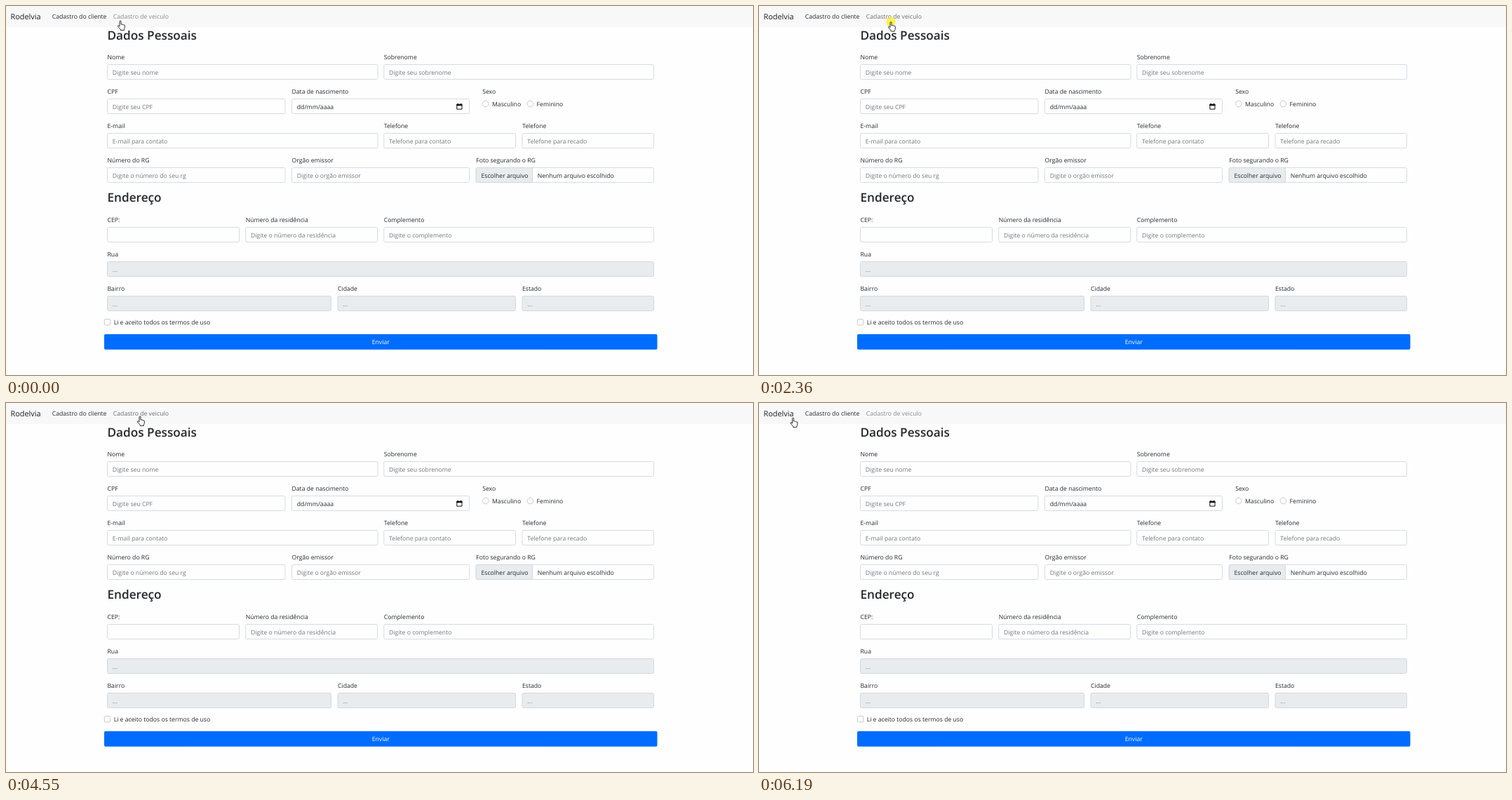
An HTML page that plays this animation: 1065 px wide and 526 px high, repeating every 6.26 s.

```html
<!DOCTYPE html>
<html lang="pt-BR">
<head>
<meta charset="utf-8">
<title>Cadastro</title>
<style>
  html, body { margin: 0; width: 100%; height: 100%; overflow: hidden; background: #fefefe; }
  svg { display: block; width: 1065px; height: 526px; }
  text { font: 8.66px "Open Sans", "Noto Sans", sans-serif; fill: #24282c; text-rendering: geometricPrecision; }
  text.title { font-size: 17.2px; font-weight: 600; }
  text.brand { font-size: 10.85px; fill: #1c1c1c; }
  text.hint { fill: #70787f; }
  text.button { fill: #fff; text-anchor: middle; }
  .box { fill: #fefefe; stroke: #d7dbdf; }
  .off { fill: #e9ecef; stroke: #d3d8dc; }
  .check { fill: #fefefe; stroke: #c9c9c9; }
  .swatch { fill: #000; stroke: #777; stroke-width: .6; }
  .blue { fill: #006dfe; }
  #click { fill: #fff01e; opacity: .75; }
</style>
</head>
<body>
<svg viewBox="0 0 1065 526">
  <rect width="1065" height="30" fill="#f8f8f8"/>
  <g id="nav"></g>
  <g id="client"></g>
  <g id="vehicle"></g>
  <circle id="click" r="6.8"/>
  <path id="hand" fill="#fff" stroke="#222" stroke-width=".95" stroke-linejoin="round"
    d="M-1 8V1.2a1 1 0 0 1 2 0V5.2q1.2-.8 1.9.3q1.2-.6 1.8.5q1.5-.4 1.6 1V9.5q0 1.5-1 2.6V13.6H.2V12.4L-3.4 8.2q-.6-1.4.8-1.4z"/>
</svg>
<script>
const $ = id => document.getElementById(id);
const LOOP = 6260;

// Drawing helpers; text is placed by its vertical centre
const text = (x, y, s, cls = '') => `<text x="${x}" y="${y + 3}" class="${cls}">${s}</text>`;
const title = (x, y, s) => `<text x="${x}" y="${y}" class="title">${s}</text>`;
const rect = (x, y, w, h, cls, r = 2) =>
  `<rect x="${x}" y="${y}" width="${w}" height="${h}" rx="${r}" class="${cls}"/>`;
const box = (x, y, right, cls = 'box') => rect(x, y, right - x, 21, cls);
const check = (x, y, s) => rect(x, y - 4.5, 8.5, 8.5, 'check') + text(x + 13.4, y + .3, s);
const radio = (x, y, s) => `<circle cx="${x}" cy="${y}" r="4.3" class="check"/>` + text(x + 9.2, y + .5, s);
const button = (x, y, w) => rect(x, y, w, 21.9, 'blue') + text(x + w / 2, y + 11.2, 'Enviar', 'button');
const calendar = (x, y) =>
  `<path d="M${x - 3.6} ${y - 3}h7.2v6.7h-7.2z" fill="none" stroke="#111"/>
   <path d="M${x - 4} ${y - 3.6}h8v2.4h-8zM${x - 2.9} ${y - 4.6}h1.2v1h-1.2zM${x + 1.7} ${y - 4.6}h1.2v1h-1.2z" fill="#111"/>`;
const field = (x, y, right, label, hint = '', off = false) =>
  text(x, y - 11, label) + box(x, y, right, off ? 'off' : 'box') + text(x + 7.3, y + 11, hint, 'hint');

$('nav').innerHTML = text(6.5, 15.6, 'Rodelvia', 'brand') +
  text(65.7, 14.8, 'Cadastro do cliente') +
  text(152.8, 14.8, 'Cadastro de veiculo');
const link = $('nav').lastElementChild;

$('client').innerHTML = [
  title(144.5, 48, 'Dados Pessoais'),
  field(144.5, 83.5, 530, 'Nome', 'Digite seu nome'),
  field(538.8, 83.5, 923.5, 'Sobrenome', 'Digite seu sobrenome'),
  field(144.5, 132.5, 398, 'CPF', 'Digite seu CPF'),
  field(407.5, 132.5, 660.5, 'Data de nascimento'),
  text(414.8, 143.5, 'dd/mm/aaaa'), calendar(646.4, 143.4),
  text(679.2, 121.5, 'Sexo'),
  radio(683.8, 139.4, 'Masculino'), radio(747.4, 139.4, 'Feminino'),
  field(144.5, 181.5, 530, 'E-mail', 'E-mail para contato'),
  field(538.8, 181.5, 726.5, 'Telefone', 'Telefone para contato'),
  field(736, 181.5, 923.5, 'Telefone', 'Telefone para recado'),
  field(144.5, 230.5, 398, 'Número do RG', 'Digite o número do seu rg'),
  field(407.5, 230.5, 660.5, 'Orgão emissor', 'Digite o orgão emissor'),
  field(670.2, 230.5, 923.5, 'Foto segurando o RG'),
  box(670.2, 230.5, 750.5, 'off'),
  text(677.5, 241.5, 'Escolher arquivo'), text(757.7, 241.5, 'Nenhum arquivo escolhido'),
  title(144.5, 279, 'Endereço'),
  field(144.5, 315.5, 332.5, 'CEP:'),
  field(341.7, 315.5, 529.5, 'Número da residência', 'Digite o número da residência'),
  field(538.8, 315.5, 923.5, 'Complemento', 'Digite o complemento'),
  field(144.5, 364.5, 923.5, 'Rua', '...', true),
  field(144.5, 413.5, 463.5, 'Bairro', '...', true),
  field(473, 413.5, 726.5, 'Cidade', '...', true),
  field(736, 413.5, 923.5, 'Estado', '...', true),
  check(140.3, 450.9, 'Li e aceito todos os termos de uso'),
  button(140, 467.8, 788.5)
].join('');

const rows = ['Modelo do veículo', 'Marca do veículo', 'Chassi do veículo', 'Placa do veículo',
  'Km autal do veículo', 'Data e hora da venda', 'Data do final da garantia'];
const extras = ['Freio abs', 'Multimidia', 'Roda aro 17', 'Cor personalizada', 'Wi-fi', 'Seguro'];

$('vehicle').innerHTML = [
  title(167.7, 86, 'Cadastro do veiculo'),
  ...rows.map((s, i) =>
    text(167.7, 105 + 30.75 * i, s) + box(292.3, Math.round(93.6 + 30.75 * i) + .5, 900.5)),
  text(299.6, 258.9, 'dd/mm/aaaa --:--'), calendar(885.9, 258),
  text(299.6, 289.6, 'dd/mm/aaaa'), calendar(885.9, 288.7),
  text(167.7, 320.4, 'Cor do veículo'),
  rect(292.3, 309.5, 608.2, 15, 'box'), rect(299.5, 313.2, 593.5, 7.3, 'swatch', 0),
  text(167.7, 347, 'Adicionais'),
  ...extras.map((s, i) => check(292.3, 346.7 + 14.85 * i, s)),
  button(167.7, 437.6, 39.1)
].join('');

// Pointer stops: time, x, y
const path = [
  [0, 163, 21], [70, 163, 21], [140, 178, 21], [600, 178, 21], [940, 134, 16], [1150, 116, 13.3],
  [1690, 116, 13.3], [2100, 188, 22.5], [2450, 188, 22.5], [2910, 114, 13.3], [3050, 111.8, 13.3],
  [3430, 111.8, 13.3], [3810, 44, 16], [3920, 37, 18], [4490, 191, 18.8], [4720, 191, 18.8],
  [5110, 40, 20], [5250, 36, 22.5], [5450, 35, 17.3], [6050, 35, 17.3], [6190, 48.5, 21], [LOOP, 48.5, 21]
];
const clicks = [[340, 410], [1210, 1350], [2290, 2430], [3250, 3390], [4610, 4690], [5790, 5920]];
const vehiclePage = [[410, 1350], [2430, 3390], [4690, 6120]];
const darkLink = [[100, 1350], [1950, 3390], [4330, 5860]];
const within = (spans, t) => spans.some(([a, b]) => t >= a && t < b);
const show = (id, on) => $(id).style.display = on ? '' : 'none';

function draw(now) {
  const t = now % LOOP;
  const i = path.findIndex(p => p[0] > t);
  const [t0, x0, y0] = path[i - 1], [t1, x1, y1] = path[i];
  const u = (t - t0) / (t1 - t0), k = u * u * (3 - 2 * u);
  const at = `translate(${x0 + (x1 - x0) * k} ${y0 + (y1 - y0) * k})`;
  $('hand').setAttribute('transform', at);
  $('click').setAttribute('transform', at);
  const vehicle = within(vehiclePage, t);
  show('vehicle', vehicle);
  show('client', !vehicle);
  show('click', within(clicks, t));
  link.style.fill = within(darkLink, t) ? '#6c6c6c' : '#8b8b8b';
  requestAnimationFrame(() => draw(performance.now() - start));
}
const start = performance.now();
draw(0);
</script>
</body>
</html>
```
